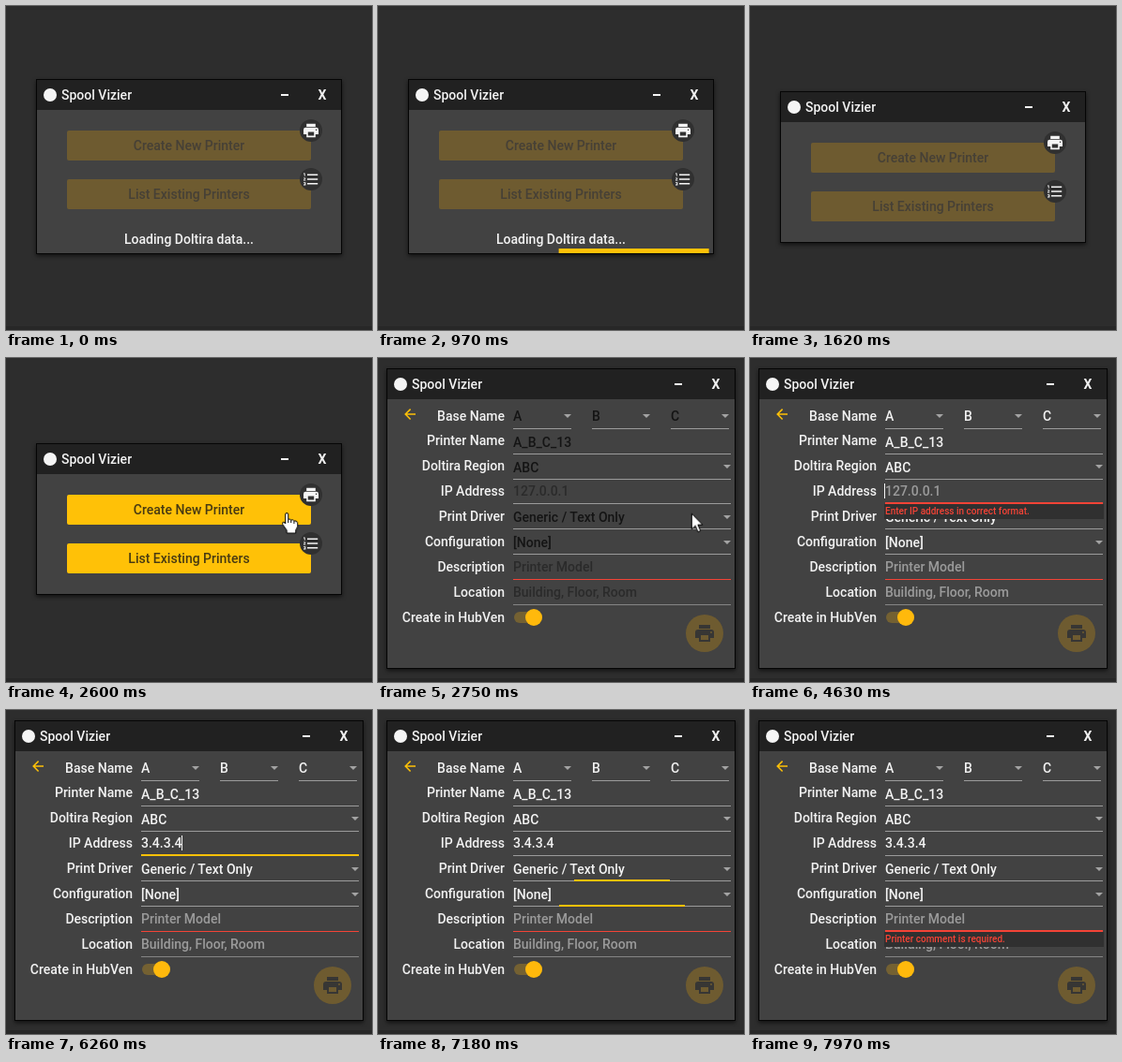
Recreate the animation shown at these times as an HTML page. Size 390 px wide and 346 px high, loop 8 s.

```html
<!DOCTYPE html>
<html lang="en">
<head>
<meta charset="utf-8">
<title>Printer setup</title>
<style>
  html, body { margin: 0; width: 100%; height: 100%; overflow: hidden; background: #2d2d2d; }
  svg { display: block; width: 390px; height: 346px; }
  text { font: 500 14px Roboto, "Open Sans", sans-serif; fill: #f2f2f2; white-space: pre; }
  .bold { font-weight: 700; }
  .mid { text-anchor: middle; }
  .end { text-anchor: end; }
  .win { fill: #424242; stroke: #050505; filter: drop-shadow(0 2px 2px #0009); }
  .bar { fill: #212121; }
  .white { fill: #f5f5f5; }
  .amber { fill: #ffc107; }

  /* Every animation shares one 8 s cycle: 1% = 80 ms */
  .hard, .soft { animation: 8s infinite step-end; }
  .soft { animation-timing-function: linear; }

  #small { animation-name: small; }
  @keyframes small {
    0% { transform: none; visibility: visible; }
    20.2% { transform: translateY(13px); visibility: visible; }
    33.7%, 100% { visibility: hidden; }
  }
  #frame { height: 186px; animation-name: frame; }
  @keyframes frame { 0% { height: 186px; } 20.2%, 100% { height: 161px; } }
  #loading { animation-name: loading; }
  @keyframes loading { 0% { visibility: inherit; } 17.95%, 100% { visibility: hidden; } }
  #progress { animation-name: progress; }
  @keyframes progress {
    0%, 2.1% { transform: translateX(-160px); }
    17.3%, 100% { transform: translateX(324px); }
  }
  .button rect { fill: #6e5b30; animation-name: face; }
  .button text { fill: #464036; animation-name: caption; }
  @keyframes face { 0% { fill: #6e5b30; } 21.45%, 100% { fill: #ffc107; } }
  @keyframes caption { 0% { fill: #464036; } 21.45%, 100% { fill: #483a12; } }

  #large { visibility: hidden; animation-name: large; }
  @keyframes large { 0% { visibility: hidden; } 33.7%, 100% { visibility: visible; } }
  #fields { animation-name: ink; }
  #fields text { fill: currentColor; }
  #fields .hint { opacity: .5; }
  @keyframes ink { 0%, 34.7% { color: #141414; } 36%, 100% { color: #f2f2f2; } }

  .focus { transform: scaleX(0); transform-box: fill-box; transform-origin: center; }
  #ipFocus { animation-name: ipFocus; }
  @keyframes ipFocus {
    0%, 43.2% { transform: scaleX(0); fill: #f44336; }
    46.2%, 78.15% { transform: none; fill: #f44336; }
    78.2%, 84.6% { transform: none; fill: #ffc107; }
    87.4%, 100% { transform: scaleX(0); fill: #ffc107; }
  }
  #driverFocus { animation-name: driverFocus; }
  @keyframes driverFocus {
    0%, 84.9% { transform: scaleX(0); }
    87.6%, 88.2% { transform: none; }
    91%, 100% { transform: scaleX(0); }
  }
  #configFocus { animation-name: configFocus; }
  @keyframes configFocus {
    0%, 88.2% { transform: scaleX(0); }
    90.9%, 92% { transform: none; }
    95.7%, 100% { transform: scaleX(0); }
  }
  #noteFocus { animation-name: noteFocus; }
  @keyframes noteFocus { 0%, 92% { transform: scaleX(0); } 94.7%, 100% { transform: none; } }

  .error { opacity: 0; }
  .error text { font-size: 10px; fill: #f44336; }
  #ipError { animation-name: ipError; }
  @keyframes ipError {
    0%, 43.4% { opacity: 0; }
    47.3%, 78.15% { opacity: 1; }
    78.2%, 100% { opacity: 0; }
  }
  #noteError { animation-name: noteError; }
  @keyframes noteError { 0%, 92% { opacity: 0; } 95.7%, 100% { opacity: 1; } }

  #ipHint { animation-name: ipHint; }
  @keyframes ipHint { 0% { visibility: inherit; } 62.4%, 100% { visibility: hidden; } }
  #typing { --w: 0px; animation-name: typing; }
  #typed rect { width: var(--w); }
  #ipCaret { transform: translateX(var(--w)); animation-name: ipCaret; }
  @keyframes typing {
    0% { --w: 0px; }
    62.45% { --w: 8px; }
    64.3% { --w: 12px; }
    67.45% { --w: 20px; }
    70.2% { --w: 24px; }
    73.1% { --w: 32px; }
    75.3% { --w: 36px; }
    78.2%, 100% { --w: 44px; }
  }
  @keyframes ipCaret {
    0% { opacity: 0; }
    43.6% { opacity: 1; }
    51.45% { opacity: 0; }
    57.8% { opacity: 1; }
    84.6%, 100% { opacity: 0; }
  }
  #noteCaret { animation-name: noteCaret; }
  @keyframes noteCaret { 0% { opacity: 0; } 93.2% { opacity: 1; } 99.6%, 100% { opacity: 0; } }

  #cursor { animation-name: travel; }
  @keyframes travel {
    0%, 25% { transform: translate(392px, 170px); animation-timing-function: ease-out; }
    29.4%, 32.5% { transform: translate(299px, 165px); }
    34.35% { transform: translate(333px, 166px); }
    36%, 40.05% { transform: translate(367px, 152px); }
    40.1%, 40.95% { transform: translate(363px, 148px); }
    41%, 100% { transform: translate(361px, 146px); }
  }
  #cursor path { stroke: #000; fill: #fff; stroke-linejoin: round; }
  #arrow { animation-name: arrow; }
  #hand { animation-name: hand; }
  #beam { animation-name: beam; }
  @keyframes arrow {
    0% { opacity: 0; }
    25.3% { opacity: 1; }
    27.6% { opacity: 0; }
    33.7% { opacity: 1; }
    40.1%, 100% { opacity: 0; }
  }
  @keyframes hand { 0% { opacity: 0; } 27.6% { opacity: 1; } 33.7%, 100% { opacity: 0; } }
  @keyframes beam { 0% { opacity: 0; } 40.1% { opacity: 1; } 43.2%, 100% { opacity: 0; } }
</style>
</head>
<body>
<svg viewBox="0 0 390 346">
  <defs>
    <path id="printer" d="M18,3H6V7H18M19,12A1,1 0 0,1 18,11A1,1 0 0,1 19,10A1,1 0 0,1 20,11A1,1 0 0,1 19,12M16,19H8V14H16M19,8H5A3,3 0 0,0 2,11V17H6V21H18V17H22V11A3,3 0 0,0 19,8Z"/>
    <path id="list" d="M7,13V11H21V13H7M7,19V17H21V19H7M7,7V5H21V7H7M3,8V5H2V4H4V8H3M2,17V16H5V20H2V19H4V18.5H3V17.5H4V17H2M4.25,10A.75,.75 0 0,1 5,10.75C5,10.95 4.92,11.14 4.79,11.27L3.12,13H5V14H2V13.08L4,11H2V10H4.25Z"/>
    <path id="drop" d="M-4,-2H4L0,2Z" fill="#a3a3a3"/>
    <rect id="line" width="232" height="1" fill="#9b9b9b"/>
    <rect id="shortLine" width="62" height="1" fill="#9b9b9b"/>
    <g id="title">
      <circle class="white" cx="14.5" cy="17" r="7"/>
      <text class="bold" style="font-weight:500" x="26.5" y="22">Spool Vizier</text>
    </g>
    <clipPath id="inside"><rect x="33" y="259" width="324" height="5"/></clipPath>
  </defs>

  <rect width="390" height="346" fill="#2d2d2d"/>
  <rect y="342" width="390" height="4" fill="#272727"/>

  <g id="small" class="hard">
    <rect id="frame" class="win hard" x="32.5" y="78.5" width="325"/>
    <rect class="bar" x="33" y="79" width="324" height="32"/>
    <use href="#title" x="32.5" y="78"/>
    <rect class="white" x="293" y="94" width="8" height="2"/>
    <text class="bold mid" x="337" y="100">X</text>
    <g class="button">
      <rect class="hard" x="65" y="133" width="260" height="32" rx="2"/>
      <text class="mid hard" x="195" y="154">Create New Printer</text>
    </g>
    <g class="button">
      <rect class="hard" x="65" y="185" width="260" height="32" rx="2"/>
      <text class="mid hard" x="195" y="206">List Existing Printers</text>
    </g>
    <circle cx="325" cy="133" r="12" fill="#303030"/>
    <circle cx="325" cy="185" r="12" fill="#303030"/>
    <use href="#printer" class="white" transform="translate(315.4 123.4) scale(.8)"/>
    <use href="#list" class="white" transform="translate(315.4 175.4) scale(.8)"/>
    <g id="loading" class="hard">
      <text class="mid" x="195" y="254">Loading Doltira data...</text>
      <g clip-path="url(#inside)">
        <rect id="progress" class="amber soft" x="33" y="259" width="160" height="5"/>
      </g>
    </g>
  </g>

  <g id="large" class="hard">
    <rect class="win" x="9.5" y="11.5" width="371" height="320"/>
    <rect class="bar" x="10" y="12" width="370" height="32"/>
    <use href="#title" x="9.5" y="11"/>
    <rect class="white" x="316" y="27" width="8" height="2"/>
    <text class="bold mid" x="360" y="33">X</text>
    <path class="amber" transform="translate(25 51) scale(.75)" d="M20,11V13H8L13.5,18.5L12.08,19.92L4.16,12L12.08,4.08L13.5,5.5L8,11H20Z"/>

    <g class="end">
      <text x="135" y="67">Base Name</text>
      <text x="135" y="93">Printer Name</text>
      <text x="135" y="120">Doltira Region</text>
      <text x="135" y="147">IP Address</text>
      <text x="135" y="174">Print Driver</text>
      <text x="135" y="201">Configuration</text>
      <text x="135" y="228">Description</text>
      <text x="135" y="255">Location</text>
      <text x="135" y="282">Create in HubVen</text>
    </g>

    <use href="#shortLine" x="144" y="75"/>
    <use href="#shortLine" x="228" y="75"/>
    <use href="#shortLine" x="312" y="75"/>
    <use href="#line" x="144" y="102"/>
    <use href="#line" x="144" y="129"/>
    <use href="#line" x="144" y="155"/>
    <use href="#line" x="144" y="182"/>
    <use href="#line" x="144" y="209"/>
    <rect x="144" y="236" width="232" height="1" fill="#f44336"/>
    <use href="#line" x="144" y="263" opacity=".75"/>
    <use href="#drop" x="202" y="62"/>
    <use href="#drop" x="286" y="62"/>
    <use href="#drop" x="370" y="62"/>
    <use href="#drop" x="372" y="116"/>
    <use href="#drop" x="372" y="170"/>
    <use href="#drop" x="372" y="197"/>

    <g id="fields" class="soft">
      <text x="144" y="67">A</text>
      <text x="228" y="67">B</text>
      <text x="312" y="67">C</text>
      <text x="144" y="95">A_B_C_13</text>
      <text x="144" y="122">ABC</text>
      <text id="ipHint" class="hint hard" x="144" y="147">127.0.0.1</text>
      <text x="144" y="175">Generic / Text Only</text>
      <text x="144" y="202">[None]</text>
      <text class="hint" x="144" y="228">Printer Model</text>
      <text class="hint" x="144" y="255">Building, Floor, Room</text>
    </g>

    <g id="typing" class="hard">
      <clipPath id="typed"><rect x="144" y="132" height="20"/></clipPath>
      <text x="144" y="147" clip-path="url(#typed)">3.4.3.4</text>
      <rect id="ipCaret" class="white hard" x="143" y="134" width="1" height="16"/>
    </g>
    <rect id="noteCaret" class="white hard" x="143" y="215" width="1" height="16"/>

    <g id="ipError" class="error soft">
      <rect x="143" y="156" width="234" height="16" fill="#303030"/>
      <text x="144" y="167">Enter IP address in correct format.</text>
    </g>
    <g id="noteError" class="error soft">
      <rect x="143" y="237" width="234" height="16" fill="#303030"/>
      <text x="144" y="248">Printer comment is required.</text>
    </g>
    <rect id="ipFocus" class="focus soft" x="144" y="154" width="232" height="2"/>
    <rect id="driverFocus" class="focus amber soft" x="144" y="181" width="232" height="2"/>
    <rect id="configFocus" class="focus amber soft" x="144" y="208" width="232" height="2"/>
    <rect id="noteFocus" class="focus soft" x="144" y="235" width="232" height="2" fill="#f44336"/>

    <rect x="145" y="271" width="30" height="12" rx="6" fill="#746132"/>
    <circle cx="166" cy="277" r="9" fill="#ffb90c"/>
    <circle cx="348" cy="294" r="20" fill="#6e5b30"/>
    <use href="#printer" x="336" y="282" fill="#373634"/>
  </g>

  <g id="cursor" class="soft">
    <path id="arrow" class="hard" d="M.5,.5V17L4.3,13.4L7,20L9.8,18.8L7,12.4H12Z"/>
    <g id="hand" class="hard">
      <path d="M-1.5,12V2Q-1.5,.5 0,.5T1.5,2V7.5Q3,6 4.5,8Q6.5,7 7.8,9Q10.5,8 11.5,11V15L9.5,19V22H0V19L-4.5,12.5Q-5,10 -3,10Z"/>
      <path d="M1.5,7V11M4.5,8V11M7.8,9V12"/>
    </g>
    <path id="beam" class="hard" style="fill:none;stroke:#eee" d="M-3,-8H-1L0,-7L1,-8H3M0,-7V7M-3,8H-1L0,7L1,8H3"/>
  </g>
</svg>
</body>
</html>
```
